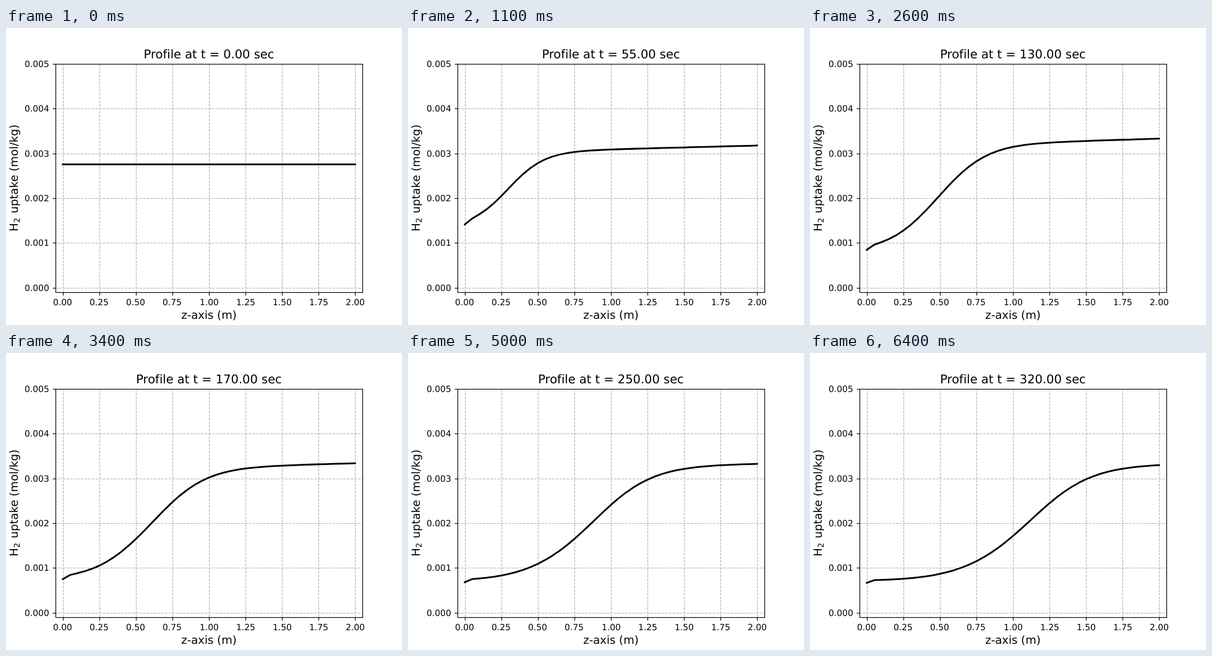
Animation of 640x480 px, one loop 6500 ms. Source, as an HTML page:

```html
<!DOCTYPE html>
<html lang="en">
<head>
<meta charset="utf-8">
<title>Uptake profile</title>
<style>
  html, body { margin: 0; width: 100%; height: 100%; overflow: hidden; background: #fff; }
  svg { display: block; width: 640px; height: 480px; }
  text {
    font-family: "DejaVu Sans", sans-serif; font-size: 13.89px;
    text-rendering: geometricPrecision; font-variant-ligatures: none;
  }
  .label { font-size: 18.06px; }
  .title { font-size: 19.44px; }
  .grid { stroke: #b0b0b0; stroke-width: 1.11; stroke-dasharray: 4.11 1.78; }
  .axis { stroke: #000; stroke-width: 1.11; fill: none; }
  .curve { stroke: #000; stroke-width: 2.78; fill: none; stroke-linecap: square; stroke-linejoin: round; }
</style>
</head>
<body>
<svg viewBox="0 0 640 480"></svg>
<script>
const svg = document.querySelector('svg');
const LOOP = 6500, STEP = 100, SECONDS_PER_STEP = 5;

const px = z => 80 + (z + 0.05) * 496 / 2.1;
const py = q => 427.2 - (q + 0.1) * 369.6 / 5.1;   // q in 0.001 mol/kg
const snap = v => Math.round(v) + 0.5;

function add(tag, attrs, content = '') {
  const node = document.createElementNS('http://www.w3.org/2000/svg', tag);
  for (const name in attrs) node.setAttribute(name, attrs[name]);
  node.textContent = content;
  return svg.appendChild(node);
}
const line = (cls, x1, y1, x2, y2) => add('line', { class: cls, x1, y1, x2, y2 });
const text = (content, x, y, cls = '', anchor = 'middle') =>
  add('text', { x, y, class: cls, 'text-anchor': anchor }, content);

for (let i = 0; i <= 8; i++) {
  const x = snap(px(i / 4));
  line('grid', x, 427.2, x, 57.6);
  line('axis', x, 427.5, x, 432.4);
  text((i / 4).toFixed(2), Math.round(px(i / 4) - 15.5), 448, '', 'start');
}
for (let i = 0; i <= 5; i++) {
  const y = snap(py(i));
  line('grid', 80, y, 576, y);
  line('axis', 80.5, y, 75.6, y);
  text((i / 1000).toFixed(3), 30, Math.round(py(i)) + 5, '', 'start');
}
const curve = add('path', { class: 'curve' });
add('rect', { class: 'axis', x: 80.5, y: 58.5, width: 496, height: 369 });
const title = text('', 328, 49, 'title');
text('z-axis (m)', 328, 470, 'label');
const yLabel = text('', 0, 0, 'label');
yLabel.setAttribute('transform', 'translate(19 242.4) rotate(-90)');
yLabel.innerHTML = 'H<tspan dx="0.5" dy="3" font-size="12.64">2</tspan><tspan dx="1.5" dy="-3"> uptake (mol/kg)</tspan>';

// A logistic front moves up the bed and widens; uptake relaxes towards the equilibrium it leaves.
const START = 2.753, RATE = 0.0187;
const positions = Array.from({ length: 41 }, (_, i) => i / 20);

function equilibrium(z, t) {
  const front = 0.19 + 0.00335 * t;
  const steepness = 5 + 5 * Math.exp(-t / 100);
  const passed = 1 / (1 + Math.exp(steepness * (z - front) - 0.03 / z));
  const behind = z === 0 ? 0.665 : 0.715;
  const ahead = 3.277 + (z - 1) * (0.041 + 0.09 / (1 + (t / 120) ** 4));
  return ahead + (behind - ahead) * passed;
}

function simulate(stepCount) {
  const gain = 1 - Math.exp(-RATE);
  let q = positions.map(() => START);
  const profiles = [q];
  for (let t = 1; t < stepCount * SECONDS_PER_STEP; t++) {
    q = q.map((value, i) => value + gain * (equilibrium(positions[i], t - 0.5) - value));
    if (t % SECONDS_PER_STEP === 0) profiles.push(q);
  }
  return profiles;
}
const profiles = simulate(LOOP / STEP);

function draw(step) {
  const points = profiles[step].map((q, i) => px(positions[i]).toFixed(2) + ' ' + py(q).toFixed(2));
  curve.setAttribute('d', 'M' + points.join('L'));
  title.textContent = `Profile at t = ${(step * SECONDS_PER_STEP).toFixed(2)} sec`;
}

const start = performance.now();
let shown = -1;
function tick(now) {
  const step = Math.floor((Math.max(0, now - start) % LOOP) / STEP);
  if (step !== shown) draw(shown = step);
  requestAnimationFrame(tick);
}
tick(start);
</script>
</body>
</html>
```
